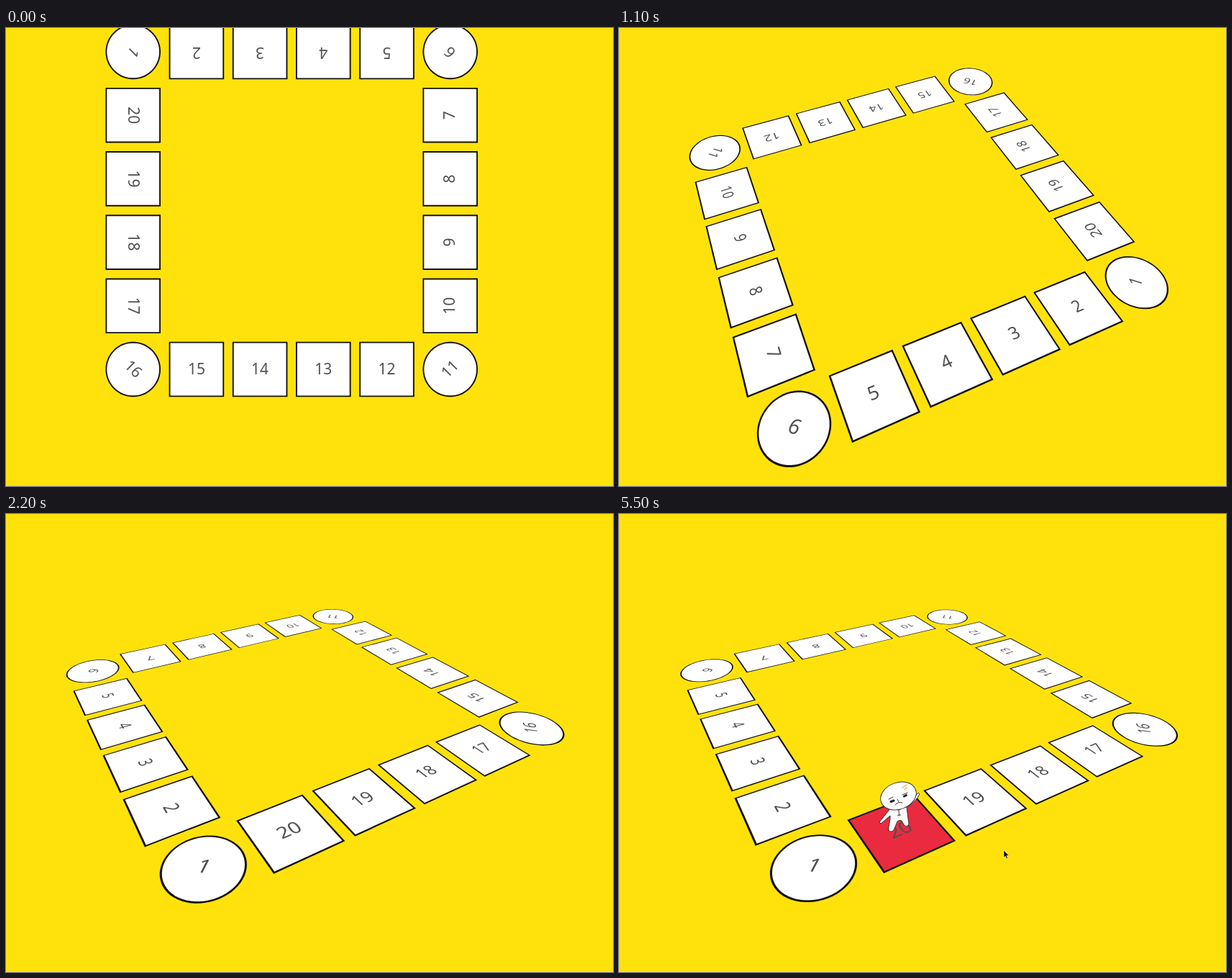
Recreate the animation shown at these times as an HTML page. Size 844x636 px, loop 5600 ms.

```html
<!DOCTYPE html>
<html lang="en">
<head>
<meta charset="utf-8">
<title>Board</title>
<style>
  html, body { margin: 0; width: 100%; height: 100%; overflow: hidden; background: #ffe20c; }
  svg { display: block; width: 844px; height: 636px; }
  .edge { fill: #15110c; }
  .face { fill: #fff; }
  .hover { fill: #118af6; }
  .taken { fill: #ea2b3f; }
  #board text { fill: #505050; font: 21px "Noto Sans", "Open Sans", sans-serif; text-anchor: middle; }
</style>
</head>
<body>
<svg viewBox="0 0 844 636">
  <g id="board"></g>
  <g id="pawn" fill="#fff" stroke="#3a3431" stroke-width="1" stroke-linecap="round" stroke-linejoin="round">
    <path d="M378 408 L362 428 L364 430 L377 419 C378 426 374 433 375 439 Q378 443 382 439 L387 427 Q390 424 393 426 L397 433 Q401 435 403 431 L400 407 Z"/>
    <path d="M400 402 Q408 398 416 387 L418 389 Q413 399 402 406 Z"/>
    <ellipse cx="388.5" cy="391.5" rx="25.5" ry="18.5" transform="rotate(-20 388.5 391.5)"/>
    <path d="M375 396 L381 393 M394 390 L401 387 M384 404 Q388 399 394 401 M387 396 L389 400" fill="none"/>
    <path d="M378 399.5 L382 398 M396.5 392 L399.5 390.5" stroke="#222" stroke-width="3"/>
    <path d="M394 380 L400 376 M397 382 L400 380" stroke="#efb44c" stroke-width="1.5"/>
    <path d="M387 411 L391 410.5 M389 411 L389.5 418 M387.5 418.5 L391.5 418" fill="none"/>
  </g>
  <g id="cursor">
    <path id="arrow" d="M0 0 L0 10 L2.3 8 L4 11.5 L5.5 10.8 L4 7.4 L7 7.2 Z"
      fill="#15120a" stroke="#fff" stroke-width=".5"/>
    <path id="hand" d="M-2 -5 Q-1 -7 .3 -5 L1.5 -1.5 L4 -1 L5.5 1 L5.5 4 L4 7 L-1 7 L-4.5 2.5 Q-4 .8 -2 2 L-.7 2.6 Z"
      fill="#fff" stroke="#222" stroke-width=".9" stroke-linejoin="round"/>
  </g>
</svg>
<script>
  const LOOP = 5600, STEP = 100, CLICK = 4700;
  const CENTER = [397.2, 253.5], DEPTH = 725;
  const HALF = 220.5, PITCH = 88.2, OUTER = 38.3, INNER = 36.4;
  const $ = id => document.getElementById(id);
  const clamp = x => Math.min(1, Math.max(0, x));
  const smooth = x => x * x * (3 - 2 * x);
  const rad = degrees => degrees * Math.PI / 180;
  const show = (id, on) => { $(id).style.display = on ? '' : 'none'; };

  function rotate([x, y], degrees) {
    const c = Math.cos(rad(degrees)), s = Math.sin(rad(degrees));
    return [x * c - y * s, x * s + y * c];
  }

  function add(name, parent, className) {
    const node = document.createElementNS('http://www.w3.org/2000/svg', name);
    if (className) node.setAttribute('class', className);
    return parent.appendChild(node);
  }

  const square = [[-1, -1], [1, -1], [1, 1], [-1, 1]];
  const circle = Array.from({ length: 60 }, (_, i) => rotate([1, 0], i * 6));

  const cells = Array.from({ length: 20 }, (_, i) => {
    const side = Math.floor(i / 5), place = i % 5;
    const cell = {
      center: rotate([place * PITCH - HALF, -HALF], 90 * side),
      angle: 90 * side + (place ? 180 : 135),
      shape: place ? square : circle,
      edge: add('polygon', $('board'), 'edge'),
      face: add('polygon', $('board'), 'face'),
      label: add('text', $('board'))
    };
    cell.label.textContent = i + 1;
    cell.label.setAttribute('y', 6.5);
    return cell;
  });
  const lastCell = cells[19];

  // cubic-bezier(.25, .1, .25, 1), solved by bisection
  function ease(x) {
    if (x <= 0 || x >= 1) return clamp(x);
    const curve = (s, a, b) => 3 * (1 - s) ** 2 * s * a + 3 * (1 - s) * s * s * b + s ** 3;
    let low = 0, high = 1;
    for (let i = 0; i < 24; i++) {
      const mid = (low + high) / 2;
      if (curve(mid, .25, .25) < x) low = mid; else high = mid;
    }
    return curve(low, .1, 1);
  }

  function camera(turn) {
    const tilt = rad(60 * turn);
    return point => {
      const [x, y] = rotate(point, 240 * turn);
      const scale = DEPTH / (DEPTH - y * Math.sin(tilt));
      return [CENTER[0] + x * scale, CENTER[1] + y * Math.cos(tilt) * scale];
    };
  }

  function drawCell({ center, angle, shape, edge, face, label }, project) {
    const locate = point => {
      const [x, y] = rotate(point, angle);
      return project([center[0] + x, center[1] + y]);
    };
    const outline = size => shape.map(([x, y]) => locate([x * size, y * size])).join(' ');
    edge.setAttribute('points', outline(OUTER));
    face.setAttribute('points', outline(INNER));

    const slope = (x, y) => {
      const a = locate([x, y]), b = locate([-x, -y]);
      return [(a[0] - b[0]) / 20, (a[1] - b[1]) / 20];
    };
    label.setAttribute('transform', `matrix(${[...slope(10, 0), ...slope(0, 10), ...locate([0, 0])]})`);
  }

  function cursorAt(t) {
    const arrive = smooth(clamp((t - 3200) / 800));
    const leave = smooth(clamp((t - 4900) / 500));
    return [470 - 53 * arrive + 118 * leave, 20 + 432 * arrive + 15 * leave];
  }

  function draw(t) {
    const u = t / 1000;
    const project = camera(ease(.0266 * u * u + .422 * u - .1168));
    for (const cell of cells) drawCell(cell, project);

    const over = t >= 3800 && t < 5100;
    const taken = t >= CLICK;
    lastCell.face.classList.toggle('hover', over && !taken);
    lastCell.face.classList.toggle('taken', taken);
    $('cursor').setAttribute('transform', `translate(${cursorAt(t)})`);
    show('cursor', t >= 3300);
    show('arrow', !over);
    show('hand', over);
    show('pawn', taken);
  }

  const start = performance.now();
  function tick() {
    const step = Math.floor((performance.now() - start + 20) / STEP);
    draw(step * STEP % LOOP);
    requestAnimationFrame(tick);
  }
  tick();
</script>
</body>
</html>
```
